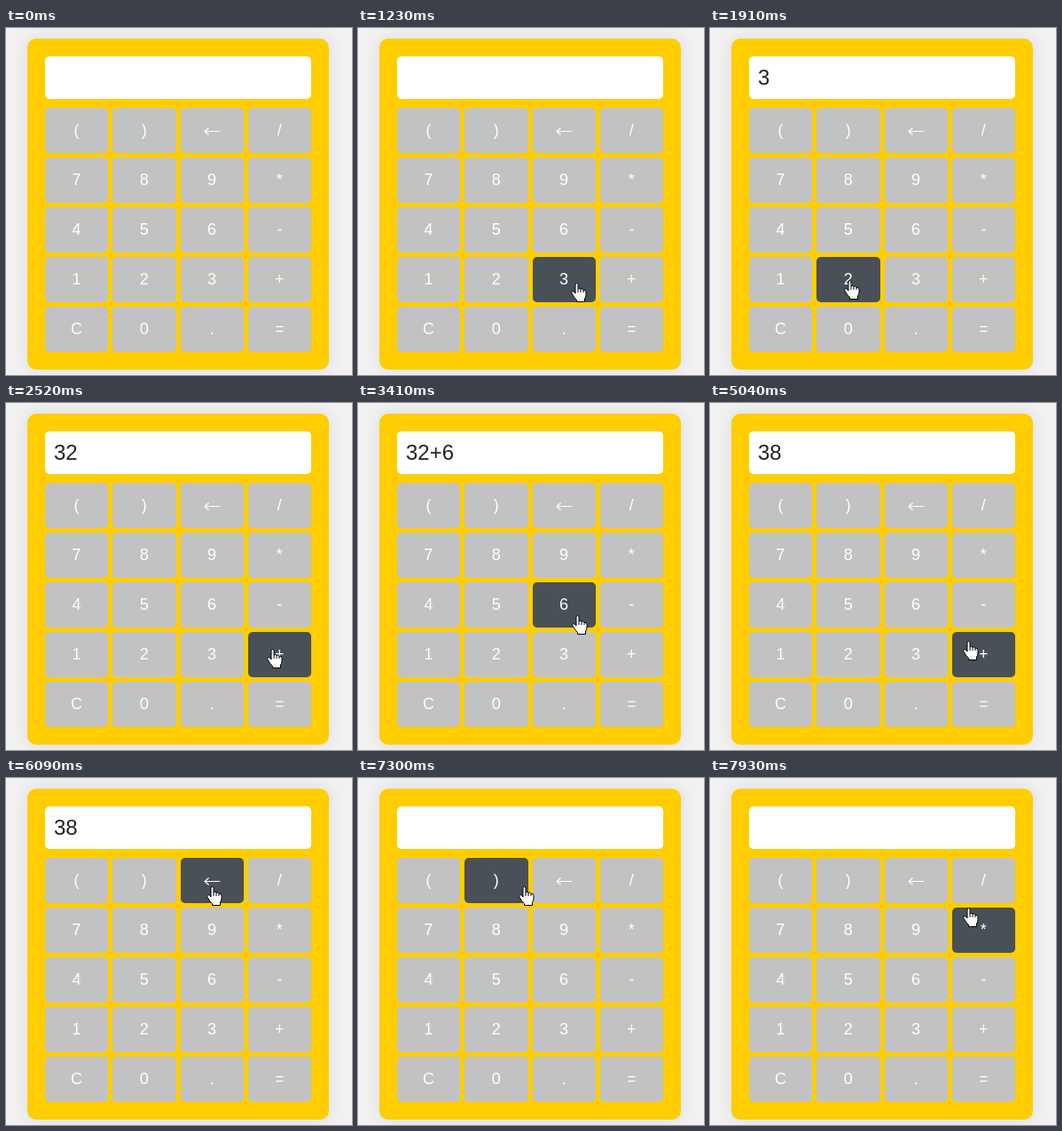
An HTML page that plays this animation: 390x391 px, repeating every 8 s.

```html
<!DOCTYPE html>
<html lang="en">
<head>
<meta charset="utf-8">
<title>Calculator</title>
<style>
  html, body { margin: 0; width: 100%; height: 100%; overflow: hidden; background: #f2f2f2; }
  svg { display: block; width: 100%; height: 100%; }
  text { font-family: "Liberation Sans", Arial, sans-serif; }
  .key rect { fill: #c2c2c2; }
  .key text { fill: #fff; font-size: 18px; text-anchor: middle; }
  .key path { fill: none; stroke: #fff; stroke-width: 1.2; }
  .key.hover rect { fill: #495057; }
  #value { fill: #212529; font-size: 24px; }
  #panel { filter: drop-shadow(0 0 10px rgba(0, 0, 0, .1)); }
  #hand, #arrow { fill: #fff; stroke: #000; stroke-linejoin: round; }
</style>
</head>
<body>
<svg viewBox="0 0 390 391">
  <rect id="panel" x="24" y="12" width="340" height="373" rx="10" fill="#ffcd00"/>
  <rect x="44" y="32" width="300" height="48" rx="5" fill="#fff"/>
  <text id="value" x="54" y="64"></text>
  <g id="keys"></g>
  <g id="pointer">
    <path id="hand" transform="translate(-1 0)" d="M-1 2.5Q-1 .5 .5 .5T2 2.5V7Q3.5 5.8 5 7.3Q6.7 6.3 8 8.3Q11 8 11 10.5V14Q11 16.5 9.5 18V21.5H.5V19.5Q-2 17.5 -4.5 13Q-6.3 10 -4 9.6Q-2.5 9.8 -1 12ZM2 7V11M5 7.5V11M8 8.5V11"/>
    <path id="arrow" d="M.5 .8V16.5L4 13L6.5 18.5L9 17.5L6.5 12H11.5Z"/>
  </g>
</svg>
<script>
const LOOP = 8000, START = 530, STEP = 68.5;
const $ = id => document.getElementById(id);

// Each visit glides to a spot (dx, dy from the key's centre), bending towards "via";
// times are in pointer steps, "press" is when the key takes effect.
const entrance = { x: 356, y: 330 };
const visits = [
  { key: "3", leave: 0, arrive: 10, dx: 15, dy: 3, via: "0", press: 12 },
  { key: "2", leave: 13, arrive: 19, dx: 2, dy: 0, press: 22 },
  { key: "+", leave: 24, arrive: 29, dx: -7, dy: -7, press: 32 },
  { key: "6", leave: 33, arrive: 40, dx: 16, dy: 11, via: "-", press: 41 },
  { key: "=", leave: 43, arrive: 50, dx: 35, dy: 25, via: "+" },
  { key: "=", leave: 50, arrive: 52, dx: 9, dy: 4, press: 53 },
  { key: "+", leave: 60, arrive: 66, dx: -16, dy: -16 },
  { key: "*", leave: 66, arrive: 72, dx: -8, dy: -7 },
  { key: "←", leave: 72, arrive: 81, dx: 1, dy: 6, via: "/", press: 85 },
  { key: "←", leave: 85, arrive: 86, dx: 1, dy: 6, press: 93 },
  { key: "8", leave: 97, arrive: 102, dx: -1, dy: -20, via: ")" },
  { key: "*", leave: 102, arrive: 108, dx: -16, dy: -26 }
];

function add(parent, tag, attrs) {
  const el = document.createElementNS("http://www.w3.org/2000/svg", tag);
  for (const name in attrs) el.setAttribute(name, attrs[name]);
  return parent.appendChild(el);
}

const keys = {};
[..."()←/789*456-123+C0.="].forEach((label, i) => {
  const left = 44 + (i % 4) * 76.25;
  const x = Math.round(left), right = Math.round(left + 71.25);
  const y = 90 + Math.floor(i / 4) * 56;
  const cx = left + 35.6, cy = y + 25.5;
  const el = add($("keys"), "g", { class: "key" });
  add(el, "rect", { x, y, width: right - x, height: 51, rx: 5 });
  if (label === "←") add(el, "path", { d: `M${cx + 9} ${cy + 1}h-17m4.5 -4l-4.5 4l4.5 4` });
  else add(el, "text", { x: cx, y: y + 31 }).textContent = label;
  keys[label] = { el, x, right, y, bottom: y + 51, cx, cy };
});

const mix = (a, b, p) => a + (b - a) * p;
const ease = p => p * p * (3 - 2 * p);
const spot = v => ({ x: keys[v.key].cx + v.dx, y: keys[v.key].cy + v.dy });

function glide(a, b, bend, p) {
  if (!bend) return mix(a, b, p);
  return mix(mix(a, bend, p), mix(bend, b, p), p);
}

function pointerAt(step) {
  let from = entrance;
  for (const v of visits) {
    if (step < v.leave) break;
    const to = spot(v), bend = keys[v.via] || {};
    const p = ease(Math.min(1, (step - v.leave) / (v.arrive - v.leave)));
    from = { x: glide(from.x, to.x, bend.cx, p), y: glide(from.y, to.y, bend.cy, p) };
  }
  return { x: Math.round(from.x), y: Math.round(from.y) };
}

function valueAt(step) {
  let value = "";
  for (const { key, press } of visits) {
    if (!(press <= step)) continue;
    if (key === "=") value = String(value.split("+").reduce((sum, n) => sum + Number(n), 0));
    else if (key === "←") value = value.slice(0, -1);
    else value += key;
  }
  return value;
}

function show(el, on) {
  el.style.display = on ? "" : "none";
}

function draw(time) {
  // The small offset absorbs uneven step lengths
  const now = time % LOOP;
  const step = now < START ? -1 : Math.floor((now - START + 20) / STEP);
  const visible = step >= 0;
  const { x, y } = pointerAt(step);

  let over = false;
  for (const k of Object.values(keys)) {
    const hit = visible && x >= k.x && x < k.right && y >= k.y && y < k.bottom;
    k.el.classList.toggle("hover", hit);
    over = over || hit;
  }
  $("value").textContent = valueAt(step);
  $("pointer").setAttribute("transform", `translate(${x} ${y})`);
  show($("pointer"), visible);
  show($("hand"), over);
  show($("arrow"), !over);
}

const begin = performance.now();
function tick() {
  draw(performance.now() - begin);
  requestAnimationFrame(tick);
}
tick();
</script>
</body>
</html>
```
